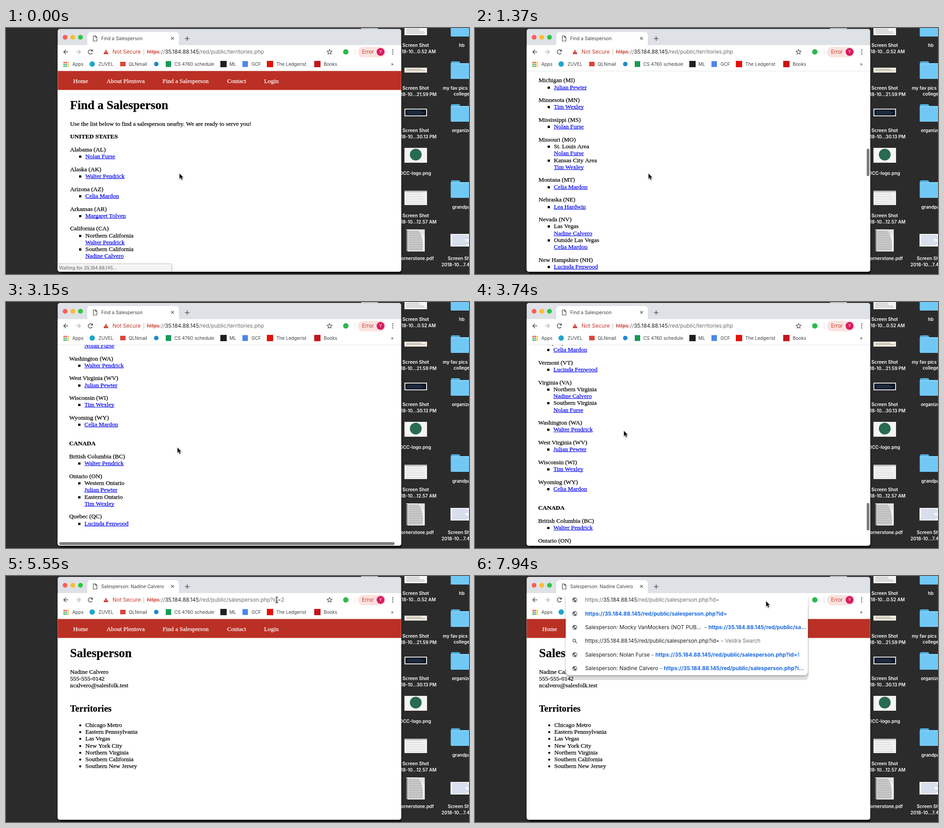
An HTML page with a canvas for the animation above (8 s loop, 1026 px wide and 546 px high).

```html
<!DOCTYPE html>
<html lang="en">
<head>
<meta charset="utf-8">
<title>Salesperson browser</title>
<style>
html, body { margin: 0; width: 100%; height: 100%; overflow: hidden; background: #2b2b2b; }
canvas { display: block; }
</style>
</head>
<body>
<canvas id="stage" width="1026" height="546"></canvas>
<script>
const c = document.getElementById('stage').getContext('2d');
const LOOP = 8000;
const ui = (size, weight = 400) => `${weight} ${size}px Inter, sans-serif`;
const serif = (size, weight = 400) => `${weight} ${size}px "Liberation Serif", serif`;
const BODY = serif(13.5), URL_FONT = ui(11.85), URL_BOLD = ui(11.85, 700), SMALL = ui(10.2);
const HOST = '35.184.88.145', PERSON_PATH = '/red/public/salesperson.php?id=';
const LINE = 15.22, GAP = 13.43, MAX_SCROLL = 2527.8;

const people = {
  D: 'Nolan Furse', R: 'Walter Pendrick', I: 'Celia Mardon', E: 'Margaret Tolven', S: 'Nadine Calvero',
  H: 'Julian Pewter', K: 'Tim Wexley', Y: 'Lea Hardwin', B: 'Lucinda Fenwood'
};
const states = `Alabama (AL)|D;Alaska (AK)|R;Arizona (AZ)|I;Arkansas (AR)|E
California (CA)|Northern California:R|Southern California:S;Colorado (CO)|I;Connecticut (CT)|B
Delaware (DE)|H;Florida (FL)|D;Georgia (GA)|D;Hawaii (HI)|R;Idaho (ID)|I
Illinois (IL)|Chicago Metro:S|Downstate Illinois:K;Indiana (IN)|H;Iowa (IA)|Y;Kansas (KS)|Y
Kentucky (KY)|D;Louisiana (LA)|E;Maine (ME)|B;Maryland (MD)|H;Massachusetts (MA)|B
Michigan (MI)|H;Minnesota (MN)|K;Mississippi (MS)|D;Missouri (MO)|St. Louis Area:D|Kansas City Area:K
Montana (MT)|I;Nebraska (NE)|Y;Nevada (NV)|Las Vegas:S|Outside Las Vegas:I;New Hampshire (NH)|B
New Jersey (NJ)|Northern New Jersey:B|Southern New Jersey:S;New Mexico (NM)|I
New York (NY)|New York City:S|Upstate New York:B;North Carolina (NC)|D;North Dakota (ND)|Y;Ohio (OH)|H
Oklahoma (OK)|E;Oregon (OR)|R;Pennsylvania (PA)|Eastern Pennsylvania:S|Western Pennsylvania:H
Rhode Island (RI)|B;South Carolina (SC)|D;South Dakota (SD)|Y;Tennessee (TN)|D;Texas (TX)|E;Utah (UT)|I
Vermont (VT)|B;Virginia (VA)|Northern Virginia:S|Southern Virginia:D;Washington (WA)|R
West Virginia (WV)|H;Wisconsin (WI)|K;Wyoming (WY)|I;*CANADA;British Columbia (BC)|R
Ontario (ON)|Western Ontario:H|Eastern Ontario:K;Quebec (QC)|B`.split(/[;\n]/);

// Lay the list out once, as lines with document positions.
const lines = [];
let docY = 274;
for (const entry of states) {
  const [name, ...areas] = entry.split('|');
  if (name[0] === '*') {
    docY += GAP;
    lines.push({ s: name.slice(1), y: docY, bold: true });
  } else lines.push({ s: name, y: docY });
  for (const area of areas) {
    const [place, who] = area.includes(':') ? area.split(':') : [null, area];
    if (place) lines.push({ s: place, y: docY += LINE, indent: true, bullet: true });
    lines.push({ s: people[who], y: docY += LINE, indent: true, link: true, bullet: !place });
  }
  docY += LINE + GAP;
}

// Step tracks: [start ms, values...]
const scrollTrack = [[0, 0], [150, 70], [330, 190], [630, 300], [780, 420], [930, 560], [1070, 730],
  [1220, 940], [1370, 1166.3], [1520, 1420], [1670, 1690], [1810, 1960], [1960, 2202.8], [2110, 2360],
  [2260, 2450], [2410, 2505], [2550, MAX_SCROLL], [3300, 2500], [3450, 2440], [3600, 2385.1]];
const cursorTrack = [[0, 384.5, 323, 'arrow'], [3000, 380, 323, 'arrow'], [3740, 330, 286, 'arrow'],
  [3890, 240, 225, 'arrow'], [4040, 216, 206, 'hand'], [4480, 330, 150, 'arrow'], [4660, 500, 82, 'arrow'],
  [4810, 575, 52, 'beam'], [5410, 600, 53, 'beam'], [5700, 645, 56, 'beam'], [7340, 645, 56, 'arrow']];
const statusTrack = [[0, `Waiting for ${HOST}...`, 0.85], [150, ''], [4040, HOST + PERSON_PATH + 2, 1],
  [4330, 'Connecting...', 1], [4960, `Waiting for ${HOST}...`, 1], [5260, '']];
const at = (track, t) => track.filter(k => k[0] <= t).pop().slice(1);

// Serif text gets a hairline outline, for the heavier smoothing of the desktop.
function put(s, x, y, font, color, align = 'left') {
  c.font = font;
  c.fillStyle = c.strokeStyle = color;
  c.textAlign = align;
  c.fillText(s, x, y);
  if (font.includes('Serif')) {
    c.lineWidth = 0.25;
    c.strokeText(s, x, y);
  }
  return x + c.measureText(s).width;
}
function box(x, y, w, h, color) { c.fillStyle = color; c.fillRect(x, y, w, h); }
function round(x, y, w, h, r, color) {
  c.fillStyle = color;
  c.beginPath();
  c.roundRect(x, y, w, h, r);
  c.fill();
}
function dot(x, y, r, color) {
  c.fillStyle = color;
  c.beginPath();
  c.arc(x, y, r, 0, 7);
  c.fill();
}
function stroke(d, color, width = 1.4, x = 0, y = 0) {
  c.save();
  c.translate(x, y);
  c.strokeStyle = color;
  c.lineWidth = width;
  c.stroke(new Path2D(d));
  c.restore();
}
function shadow(blur, y, color) { c.shadowBlur = blur; c.shadowOffsetY = y; c.shadowColor = color; }

function sheet(x, y, w, h, bg, ink, step = 3) {
  box(x, y, w, h, bg);
  for (let i = 3; i < h - 2; i += step) box(x + 4, y + i, (w - 8) * (0.65 + 0.35 * Math.sin(i * 5) ** 2), 1, ink);
}
function desktop() {
  box(0, 0, 1026, 546, '#2b2b2b');
  box(787, 0, 37, 2, '#c8c8c8');
  sheet(883, -10, 50, 26, '#f4f4f4', '#aaa');
  sheet(883, 88, 50, 11, '#efebdf', '#9a9384');
  box(883, 179, 50, 17, '#e6e6e6');
  sheet(885, 181, 46, 13, '#0b1524', '#40536c');
  box(883, 266, 50, 33, '#f5f5f2');
  dot(908, 281, 13, '#286b50');
  sheet(883, 361, 50, 32, '#f1f1f1', '#d3d3d3', 5);
  box(883, 361, 50, 3, '#bcbcbc');
  sheet(887, 447, 41, 49, '#f1f1f1', '#808080', 2.5);
  for (let y = 449; y < 495; y += 3) box(886, y, 4, 1.6, '#222');
  c.fillStyle = '#e2e2e2';
  c.fill(new Path2D('M910 447L928 463V447Z'));
  sheet(985, 457, 50, 28, '#f3f5fa', '#a3b2d0');
  for (const y of [-20, 74, 169, 338]) {
    round(986, y, 20, 10, 3, '#54afe0');
    round(985.5, y + 4, 50, 35, 2, '#72c8f4');
    box(985.5, y + 5, 50, 1, '#9adbfa');
  }
  const label = (s, x, y, align = 'center') => put(s, x, y, ui(10, 600), '#fff', align);
  [[42, '0.52 AM'], [137, '21.59 PM'], [231, '30.13 PM'], [420, '12.57 AM']].forEach(([y, end]) => {
    label('Screen Shot', 908, y);
    label('2018-10...' + end, 908, y + 13.5);
  });
  label('OCC-logo.png', 907, 326);
  label('Cornerstone.pdf', 908, 515);
  label('hb', 1010, 42);
  label('my fav pics for', 968, 137, 'left');
  label('college', 992, 150, 'left');
  label('organized', 988, 231, 'left');
  label('grandpa', 989, 401, 'left');
  label('Screen Shot', 979, 515, 'left');
  label('2018-10...7.41 PM', 965, 529, 'left');
}

function urlText(x, y, path, strike) {
  const start = x;
  x = put('https', x, y, URL_FONT, strike ? '#c5392d' : '#666');
  if (strike) box(start, y - 4, x - start, 1, '#c5392d');
  x = put('://', x, y, URL_FONT, '#666');
  x = put(HOST, x, y, URL_FONT, '#202124');
  return put(path, x, y, URL_FONT, '#6b6e72');
}

function chrome(t, loaded) {
  const loading = t >= 4190 && t < 5110;
  box(114, 38, 762, 57, '#fff');
  round(180, 9, 203, 31, [7, 7, 0, 0], '#fff');
  ['#fb5f57', '#fdbc2e', '#2ac840'].forEach((color, i) => dot(131 + 17 * i, 20.5, 5.3, color));
  if (loading) {
    c.strokeStyle = '#888';
    c.lineWidth = 1.4;
    c.beginPath();
    const a = Math.PI - Math.floor((t - 4810) / 149) * 0.9;
    c.arc(197, 23, 5, a, a + 1.4);
    c.stroke();
  } else stroke('M193.5 17.5H198.5L201.5 20.5V29H193.5ZM198.5 17.5V20.5H201.5', '#444', 1.2);
  put(loaded ? 'Salesperson: ' + people.S : 'Find a Salesperson', 211, 27, SMALL, '#3c4043');
  stroke('M366 20L372 26M372 20L366 26', '#55595e', 1.2);
  stroke('M396.5 23.5H406.5M401.5 18.5V28.5', '#505458', 1.5);
  stroke('M5 0H-5M0 -5L-5 0L0 5', '#50545a', 1.5, 133, 53);
  stroke('M-5 0H5M0 -5L5 0L0 5', '#b4b7bb', 1.5, 160, 53);
  if (loading) stroke('M-4 -4L4 4M4 -4L-4 4', '#50545a', 1.5, 187, 53);
  else {
    stroke('M4 2.5A4.7 4.7 0 1 1 3.2 -3.4', '#50545a', 1.5, 187, 53);
    c.fillStyle = '#50545a';
    c.fill(new Path2D('M192.5 47V52.2H187.3Z'));
  }
  c.fillStyle = '#cf3428';
  c.fill(new Path2D('M221.5 48L227 58H216Z'));
  box(221, 51.5, 1, 3, '#fff');
  box(221, 55.5, 1, 1, '#fff');
  put('Not Secure', 236, 57, URL_FONT, '#c5392d');
  box(305, 47, 1, 13, '#b9b9b9');
  urlText(312, 57, loaded ? PERSON_PATH + 2 : '/red/public/territories.php', true);
  stroke('M0 -5.5L1.6 -1.8L5.5 -1.5L2.5 1.2L3.5 5L0 2.9L-3.5 5L-2.5 1.2L-5.5 -1.5L-1.6 -1.8Z', '#505458', 1.2, 717, 53);
  dot(753, 53, 6, '#2db84d');
  box(773, 46, 1, 14, '#ddd');
  round(780, 42, 61, 23, 11.5, '#fbe2df');
  put('Error', 789, 57, ui(11.2), '#c5392d');
  dot(830, 53, 8.7, '#d81b60');
  put('Y', 830, 56.3, ui(9), '#fff', 'center');
  [48.5, 53, 57.5].forEach(y => dot(857, y, 1.3, '#50545a'));

  const apps = ['#ea4335', '#ea4335', '#fbbc05', '#34a853', '#4285f4', '#fbbc05', '#34a853', '#34a853', '#fbbc05'];
  apps.forEach((color, i) => box(127.5 + i % 3 * 4.2, 75 + Math.floor(i / 3) * 4.2, 3, 3, color));
  dot(191, 80, 6, '#1fa6cf');
  box(253, 75, 12, 10, '#d8453a');
  dot(333, 80, 5, '#2288cc');
  box(354, 73.5, 12, 13, '#159a55');
  box(475, 73, 14, 14, '#202020');
  box(524, 73.5, 12, 13, '#4a86ec');
  box(578, 73, 14, 14, '#e3120b');
  box(683, 73, 14, 14, '#c4161c');
  [['Apps', 147], ['ZUVEL', 205], ['QLNmail', 272], ['CS 4760 schedule', 373], ['ML', 495], ['GCF', 544],
    ['The Ledgerist', 599], ['Books', 704], ['»', 853]].forEach(([s, x]) => put(s, x, 83.7, SMALL, '#3c4043'));
  box(114, 95, 762, 0.7, '#d4d4d4');
}

function navBar(x, y) {
  box(114, y, 762, 42.5, '#bb3024');
  [['Home', 149], ['About Plentova', 223], ['Find a Salesperson', 347], ['Contact', 490], ['Login', 572]]
    .forEach(([s, left]) => put(s, left + x, y + 26.5, BODY, '#fff'));
}

function territories(scroll, dx) {
  if (scroll < 500) {
    navBar(dx, 95 - scroll);
    put('Find a Salesperson', 142 + dx, 180 - scroll, serif(27, 700), '#000');
    put('Use the list below to find a salesperson nearby. We are ready to serve you!', 142 + dx, 217 - scroll, BODY, '#000');
    put('UNITED STATES', 142 + dx, 245 - scroll, serif(13.5, 700), '#000');
  }
  for (const line of lines) {
    const y = Math.round(line.y - scroll), x = (line.indent ? 175.7 : 142) + dx;
    if (y < 85 || y > 560) continue;
    const end = put(line.s, x, y, line.bold ? serif(13.5, 700) : BODY, line.link ? '#0000ee' : '#000');
    if (line.link) box(x, y + 1, end - x, 1, '#0000ee');
    if (line.bullet) box(162 + dx, y - 6, 5, 5, '#000');
  }
}

function personPage() {
  navBar(0, 95);
  put('Salesperson', 142, 180, serif(27, 700), '#000');
  [people.S, '555-555-0142', 'ncalvero@salesfolk.test'].forEach((s, i) => put(s, 142, Math.round(217 + i * LINE), BODY, '#000'));
  put('Territories', 142, 301, serif(20.1, 700), '#000');
  ['Chicago Metro', 'Eastern Pennsylvania', 'Las Vegas', 'New York City', 'Northern Virginia',
    'Southern California', 'Southern New Jersey'].forEach((s, i) => {
    const y = Math.round(335 + i * LINE);
    put(s, 175.7, y, BODY, '#000');
    dot(164.5, y - 3.5, 2.3, '#000');
  });
}

function scrollbars(t, scroll) {
  if ((t >= 150 && t < 3000) || (t >= 3300 && t < 3890))
    round(868, 97 + 370 * scroll / MAX_SCROLL, 6, 61, 3, '#7d7d7d');
  if (t >= 3000 && t < 3740) round(118, 533, 743, 6.5, 3, '#7d7d7d');
}

function statusBubble(text, opacity) {
  if (!text) return;
  c.save();
  shadow(4, 1, 'rgba(0,0,0,.35)');
  round(114, 523.5, 253, 18, [0, 3, 0, 0], `rgba(255,255,255,${opacity})`);
  c.restore();
  stroke('M114 523.5H364Q367 523.5 367 526V541', '#c4c4c4', 1);
  put(text, 117.5, 536, SMALL, '#6a6a6a');
}

function globe(y) {
  dot(221, y, 5.4, '#5f6368');
  c.save();
  c.translate(221, y);
  c.fillStyle = '#fff';
  c.fill(new Path2D('M-4.3 -0.5L-0.8 2V4.2Q-4.2 3.4 -4.3 -0.5ZM1 -4V-2.6L-1 -1.6V0H2L2.6 2.2L3.6 2.4Q5.6 -2 1 -4Z'));
  c.restore();
}
function lens(y) {
  stroke('M2 -1A3 3 0 1 1 -4 -1A3 3 0 1 1 2 -1M1.2 1.2L5 5', '#5f6368', 1.4, 221, y);
}

// Each row is a list of [text, style] runs.
function suggestions(t) {
  const typed = t >= 7340;
  const full = 'https://' + HOST + PERSON_PATH;
  const cut = full.slice(0, -2) + '...';
  const named = (name, link, tail = '') => [['Salesperson: ' + name, 'dark'], [' – ', 'gray'], [link, 'link'], [tail, 'blue']];
  const search = url => [[url, 'dark'], [' – Veldra Search', 'gray']];
  const rows = typed
    ? [[[full, 'link']], named('Mocky VanMockers (NOT PUB... ', 'https://' + HOST + '/red/public/sa...'),
      search(full), named(people.D, full, '1'), named(people.S, cut)]
    : [named(people.S, cut), search(full + 2)];
  const bottom = typed ? 220 : 129;

  round(204, 60, 535, bottom - 49, 8, 'rgba(0,0,0,.12)');
  c.save();
  shadow(5, 2, 'rgba(0,0,0,.3)');
  round(201, 41, 536.5, bottom - 41, 8, '#fff');
  c.restore();
  round(201, 38, 536.5, bottom - 38, 8, '#fff');

  globe(53);
  if (typed) {
    const end = urlText(244, 57, PERSON_PATH, false);
    if (t < 7940) box(Math.round(end), 45, 1, 15, '#111');
  } else {
    c.font = URL_FONT;
    if (t < 7050) box(234, 45, c.measureText(full + 2).width, 16, '#a9cdf5');
    put(full + 2, 234, 57, URL_FONT, '#202124');
  }
  const colors = { dark: '#202124', gray: '#6b6e72', link: '#1a6ae0', blue: '#1a6ae0' };
  rows.forEach((row, i) => {
    const y = 83.5 + i * 30.4;
    (row[1] && row[1][0].includes('Search') ? lens : globe)(y);
    row.reduce((x, [s, style]) => put(s, x, Math.round(y + 4), style === 'link' ? URL_BOLD : URL_FONT, colors[style]), 244);
  });
}

function cursor(x, y, kind) {
  c.save();
  c.translate(x, y);
  if (kind === 'beam') {
    const d = 'M-3 -6.5Q0 -6.5 0 -4.5Q0 -6.5 3 -6.5M0 -5V5M-3 6.5Q0 6.5 0 4.5Q0 6.5 3 6.5M-1.5 2H1.5';
    stroke(d, '#fff', 2.6);
    stroke(d, '#111', 1.2);
  } else {
    const shape = new Path2D(kind === 'hand'
      ? 'M-1 0Q1 -1.5 2 1V5L7 6Q9 7 8 10L7 14H0L-4 8Q-4 6 -1 8Z'
      : 'M0 0V11.8L2.7 9.3L4.7 13.8L6.7 12.9L4.8 8.5H8.4Z');
    shadow(2, 1, 'rgba(0,0,0,.4)');
    c.strokeStyle = '#fff';
    c.lineWidth = 1.8;
    c.stroke(shape);
    c.shadowColor = 'transparent';
    c.fillStyle = kind === 'hand' ? '#fff' : '#111';
    c.fill(shape);
    if (kind === 'hand') {
      c.strokeStyle = '#111';
      c.lineWidth = 1;
      c.stroke(shape);
    }
  }
  c.restore();
}

function draw(t) {
  const loaded = t >= 4960;
  const [scroll] = at(scrollTrack, t);
  const dx = t < 150 ? 0 : t < 3000 ? -1 : -2;
  desktop();
  box(121, 541, 755, 5, '#161616');
  c.save();
  shadow(4, 1, 'rgba(0,0,0,.6)');
  round(114.5, 2, 761.2, 539, 5, '#dee1e6');
  c.restore();

  c.save();
  c.beginPath();
  c.roundRect(114.5, 2, 761.2, 539, 5);
  c.clip();
  chrome(t, loaded);
  c.beginPath();
  c.rect(114, 95.5, 762, 446);
  c.clip();
  box(114, 95.5, 762, 446, '#fff');
  if (loaded) personPage();
  else {
    territories(scroll, dx);
    scrollbars(t, scroll);
  }
  statusBubble(...at(statusTrack, t));
  c.restore();

  if (t >= 6300) suggestions(t);
  cursor(...at(cursorTrack, t));
}

function frame() {
  draw(performance.now() % LOOP);
  requestAnimationFrame(frame);
}
frame();
</script>
</body>
</html>
```
